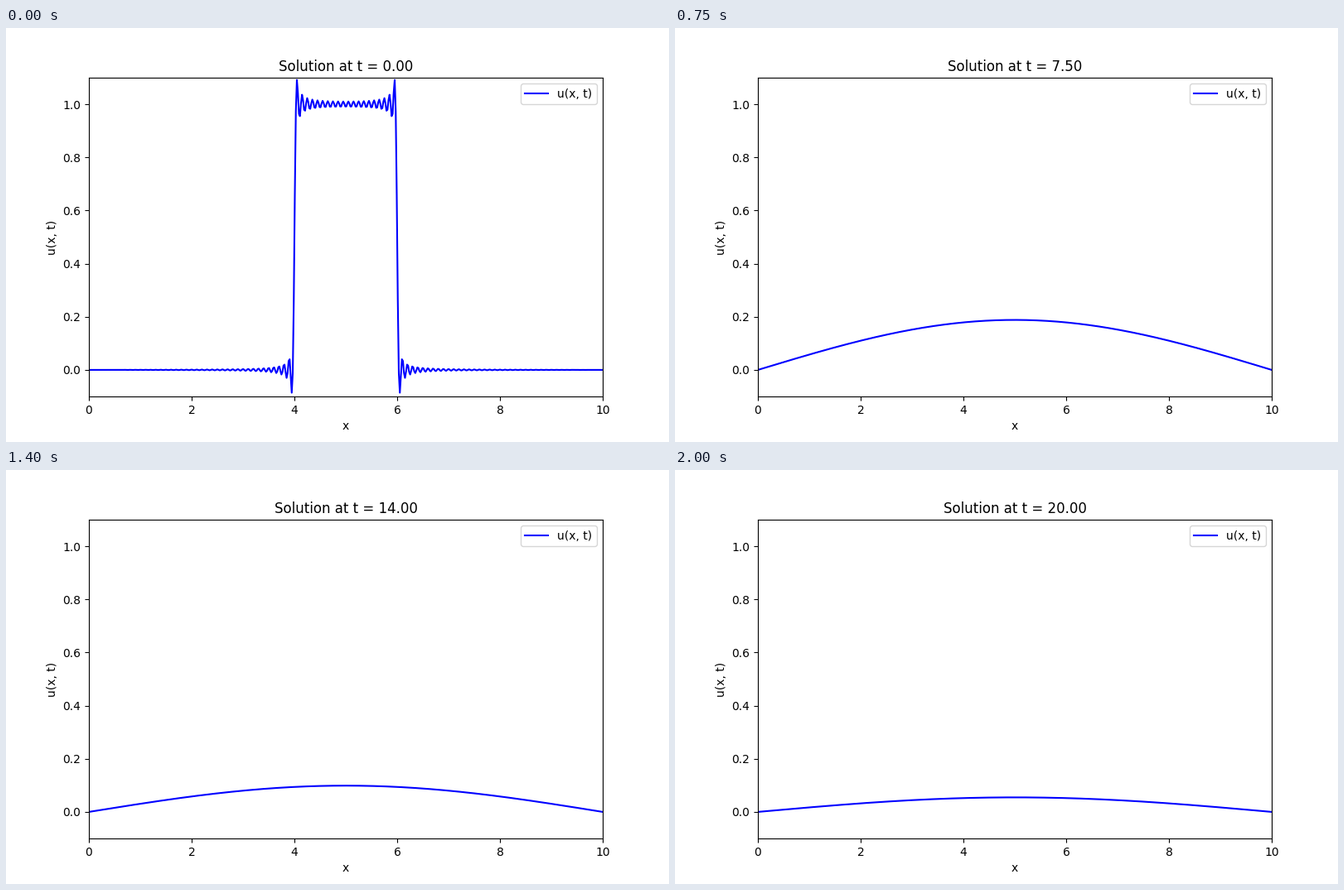
Animation, 800 px wide and 500 px high, one loop 2.05 s. Source, as a matplotlib script:

```python
import numpy as np
import matplotlib.pyplot as plt
from matplotlib.animation import FuncAnimation

plt.rcParams["font.family"] = "DejaVu Sans"

LENGTH = 10.0
ALPHA = 1.0
TERMS = 200
FRAMES = 41
DT = 0.5

x = np.linspace(0, LENGTH, 500)
k = np.arange(1, TERMS + 1) * np.pi / LENGTH

# Sine series of a unit pulse on 4 <= x <= 6
coef = 2 / LENGTH * (np.cos(4 * k) - np.cos(6 * k)) / k
modes = np.sin(np.outer(x, k))


def solve(t):
    return modes @ (coef * np.exp(-ALPHA * k**2 * t))


fig, ax = plt.subplots(figsize=(8, 5), dpi=100)
line, = ax.plot(x, solve(0), color="blue", lw=1.5, label="u(x, t)")
ax.set_xlim(0, LENGTH)
ax.set_ylim(-0.1, 1.1)
ax.set_xlabel("x")
ax.set_ylabel("u(x, t)")
ax.legend(loc="upper right")
title = ax.set_title("Solution at t = 0.00")


def update(i):
    t = i * DT
    line.set_ydata(solve(t))
    title.set_text(f"Solution at t = {t:.2f}")
    return line, title


anim = FuncAnimation(fig, update, frames=FRAMES, interval=50, repeat=True,
                     repeat_delay=0, blit=False)
plt.show()
```
